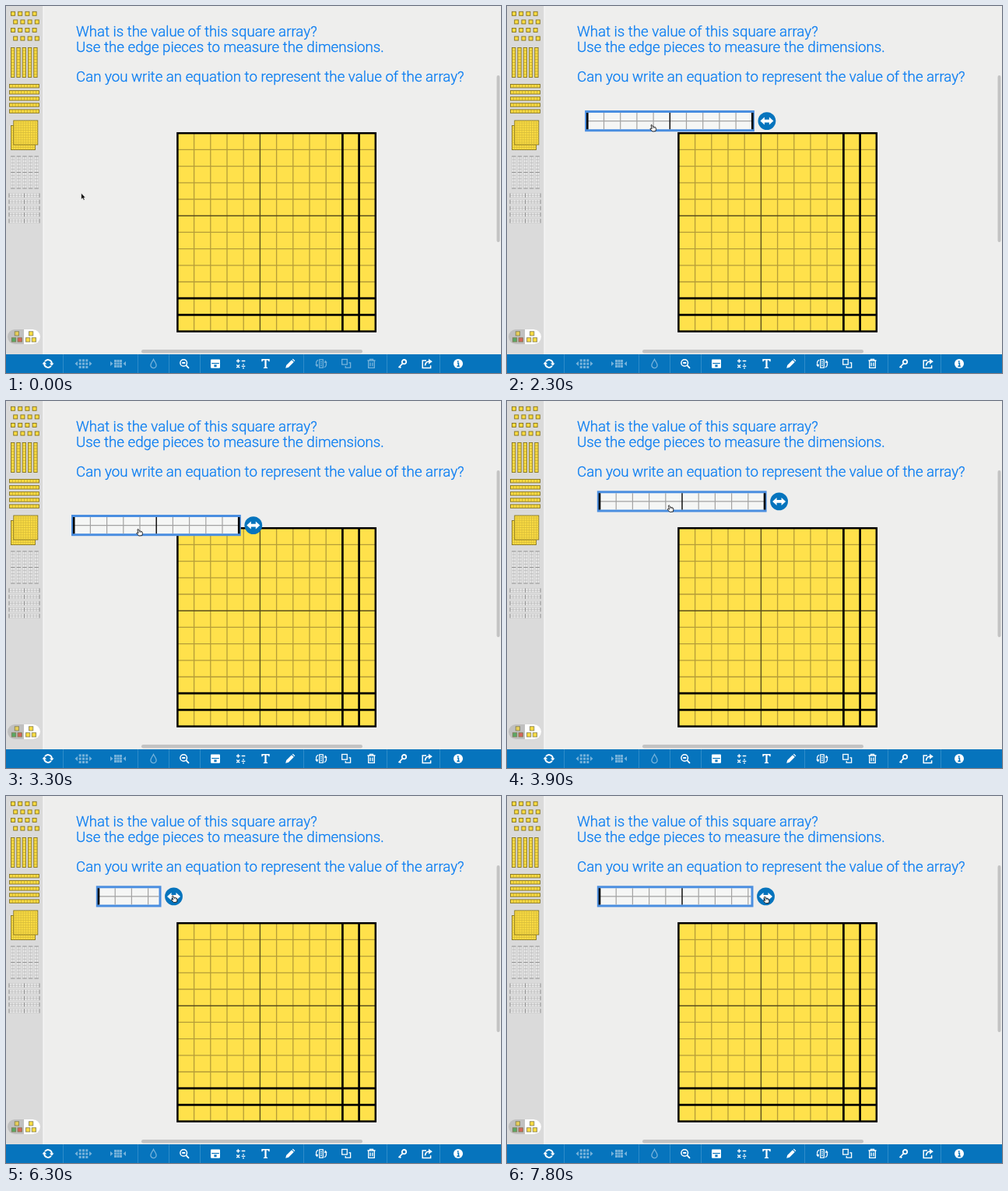
An HTML page that plays this animation: 636x471 px, repeating every 8900 ms.

```html
<!DOCTYPE html>
<html lang="en">
<head>
<meta charset="utf-8">
<title>Square array</title>
<style>
html, body { margin: 0; width: 100%; height: 100%; overflow: hidden; background: #eeeeed; }
svg { display: block; width: 636px; height: 471px; }
.ask { font: 300 18.69px Roboto, sans-serif; fill: #087cf2; stroke: #087cf2; stroke-width: .3px; }
</style>
</head>
<body>
<svg id="stage" viewBox="0 0 636 471" xmlns="http://www.w3.org/2000/svg">
  <rect width="636" height="471" fill="#eeeeed"/>
  <g id="side"></g>
  <g class="ask">
    <text x="90" y="39.4">What is the value of this square array?</text>
    <text x="90" y="58.8">Use the edge pieces to measure the dimensions.</text>
    <text x="90" y="97.2">Can you write an equation to represent the value of the array?</text>
  </g>
  <g id="array"></g>
  <g fill="#c3c3c3">
    <rect x="630.5" y="89" width="4" height="214" rx="2"/>
    <rect x="174" y="441" width="284" height="4.4" rx="2.2"/>
  </g>
  <g id="tools"></g>
  <g id="bar">
    <rect id="frame" x="1.5" y="1.5" height="24.2" fill="#f5f6f5" stroke="#4a8ee0" stroke-width="3"/>
    <path id="thin" fill="none" stroke="#a3a3a3" stroke-width="1.2"/>
    <path id="mid" fill="none" stroke="#111" stroke-width="1.5"/>
    <path id="thick" fill="none" stroke="#000" stroke-width="2.6"/>
    <g id="knob">
      <circle r="11.4" fill="#0674bd"/>
      <path d="M-8.5 0l5.5-5v3.2h6v-3.2l5.5 5l-5.5 5v-3.2h-6v3.2z" fill="#fff"/>
    </g>
  </g>
  <path id="arrow" d="M0 0V7.8L1.8 6.2L3.1 9L4.4 8.4L3.2 5.7H5.4Z" fill="#000" stroke="#fff" stroke-width=".5"/>
  <g id="hand" stroke="#111" stroke-width=".9" stroke-linejoin="round">
    <path d="M-2.6-3.9Q-1.6-5-.9-3.6L.1-1.4Q1.2-2.3 1.9-1.4Q3.1-1.8 3.6-.5Q4.2 1.6 3.4 3.8L-.6 4.2L-3.6 1.4Q-4-.1-2.3.4L-1.4.9Z" fill="#fff"/>
    <path d="M.2-1.2l.7 1.5M2-1.2l.5 1.3" fill="none" stroke-width=".6"/>
  </g>
</svg>
<script>
const $ = id => document.getElementById(id);
const rect = (x, y, w, h, more) => `<rect x="${x}" y="${y}" width="${w}" height="${h}" ${more}/>`;
const path = (d, more = '') => `<path d="${d}" ${more}/>`;
const range = n => [...Array(n).keys()];
const GOLD = 'fill="#fbdc42" stroke="#83721f" stroke-width=".9"';

// a strip or sheet cut into cols x rows
function sheet(x, y, w, h, cols, rows, look, ink) {
  let d = '';
  for (let i = 1; i < cols; i++) d += `M${x + w * i / cols} ${y}v${h}`;
  for (let i = 1; i < rows; i++) d += `M${x} ${y + h * i / rows}h${w}`;
  return rect(x, y, w, h, look) + path(d, `stroke="${ink}" stroke-width=".7"`);
}

function drawSide() {
  let s = rect(0, 0, 47.5, 447, 'fill="#dadada"') + rect(47.5, 0, 1.2, 447, 'fill="#f6f6f6"');
  for (const r of range(4)) for (const c of range(4))
    s += rect(6.5 + c * 9.2 + r % 2 * 3.2, 7.3 + r * 10.6, 5, 5, GOLD);
  for (const i of range(5)) {
    s += sheet(6.5 + i * 7.3, 53.5, 4.4, 38, 1, 10, GOLD, '#b39c30');
    s += sheet(4.5, 100.5 + i * 8.1, 38, 4.4, 10, 1, GOLD, '#b39c30');
  }
  s += sheet(6.5, 153.5, 31, 31, 10, 10, GOLD, '#d3b93b');
  s += sheet(9.8, 147, 31, 31, 10, 10, GOLD, '#d3b93b');
  const pale = 'fill="#ebebeb" stroke="#c6c6c6" stroke-width=".5"';
  for (const i of range(5)) {
    const x = 6.5 + i * 7.6, y = 240.8 + i * 8.2;
    s += sheet(x, 193, 4.6, 41, 2, 10, pale, '#b4b4b4') +
      path(`M${x - .4} 193h5.4M${x - .4} 213.5h5.4M${x - .4} 234h5.4`, 'stroke="#858585" stroke-width=".8"');
    s += sheet(4, y, 39, 4.6, 10, 2, pale, '#b4b4b4') +
      path(`M4 ${y - .4}v5.4M23.5 ${y - .4}v5.4M43 ${y - .4}v5.4`, 'stroke="#858585" stroke-width=".8"');
  }
  s += rect(2, 415, 42, 19, 'rx="9.5" fill="#c0c0c0"');
  s += path('M23 415h11.5a9.5 9.5 0 0 1 0 19H23z', 'fill="#fff"');
  const chip = (x, y, c) => rect(x, y, 5.4, 5.2, `fill="${c}" stroke="#7d7a50" stroke-width=".8"`);
  s += chip(11.2, 417.8, '#e6cd58') + chip(7.3, 425.8, '#5aa865') + chip(15, 425.8, '#d3645a');
  s += chip(29.4, 417.8, '#fbdc42') + chip(25.4, 425.8, '#fbdc42') + chip(33.2, 425.8, '#fbdc42');
  $('side').innerHTML = s;
}

function drawArray() {
  const x = 220.4, y = 163.2, u = 21.2, size = 12 * u;
  const cut = list => list.map(i => `M${x + i * u} ${y}v${size}M${x} ${y + i * u}h${size}`).join('');
  $('array').innerHTML = rect(x, y, size, size, 'fill="#ffe14b"') +
    path(cut([1, 2, 3, 4, 6, 7, 8, 9]), 'stroke="#b59d38" stroke-width="1.3"') +
    path(cut([5]), 'stroke="#5c501d" stroke-width="1.4"') +
    path(cut([10, 11]), 'stroke="#000" stroke-width="2.7"') +
    rect(x, y, size, size, 'fill="none" stroke="#000" stroke-width="2.5"');
}

function drawTools() {
  const solid = 'fill="#fff" stroke="none"';
  const icon = (x, body) => `<g transform="translate(${x} 459)">${body}</g>`;
  const dots = (x, y, cols, rows, gap, size) => {
    let s = '';
    for (const r of range(rows)) for (const c of range(cols))
      s += rect(x + c * gap, y + r * gap, size, size, solid);
    return s;
  };
  const dim = [
    icon(99.5, dots(-5.8, -5.6, 3, 3, 4.3, 3) +
      path('M-7.5-3l-3.5 3l3.5 3zM7.5-3l3.5 3l-3.5 3z', solid)),
    icon(144, dots(-5, -5, 3, 3, 3.5, 3) +
      path('M-10-3l3.5 3l-3.5 3zM10-3l-3.5 3l3.5 3z', solid)),
    icon(189.5, path('M0-5.5C1.5-2.5 3.6-.5 3.6 2A3.6 3.6 0 0 1-3.6 2C-3.6-.5-1.5-2.5 0-5.5z', 'stroke-width="1.3"'))
  ].join('');
  const edit = [
    icon(405, rect(-2.3, -5.2, 4.6, 10.4, 'stroke-width="1.2"') +
      path('M-.8-2.4H.8M-.8 0H.8M-.8 2.4H.8', 'stroke-width="1.2"') +
      path('M-3.8-4.6Q-7.4-3.6-6.2 2.2M3.8 4.6Q7.4 3.6 6.2-2.2', 'stroke-width="1.2"') +
      path('M-7.8 1.4l2.8 3l1.2-3.6zM7.8-1.4l-2.8-3l-1.2 3.6z', solid)),
    icon(437, rect(-5.3, -5.5, 6.6, 6.6, 'stroke-width="1.3"') + path('M3.4-1.2h2.2v6.4H-.8v-2.2', 'stroke-width="1.3"')),
    icon(469.5, path('M-5-4H5M-2-4v-1.6h4V-4M-3.8-3.5V5.4h7.6V-3.5M-1.4-1.5v4.8M1.4-1.5v4.8', 'stroke-width="1.3"'))
  ].join('');
  const plain = [
    icon(54, path('M-4-2.8A4.9 4.9 0 0 1 4.9 0M4 2.8A4.9 4.9 0 0 1-4.9 0', 'stroke-width="1.9"') +
      path('M1.9-.6h5.6L4.8 2.8zM-1.9.6h-5.6L-4.8-2.8z', solid)),
    icon(229, '<circle cx="-.8" cy="-1" r="4.3"/>' + path('M-2.8-1h4M2.4 2.2L6 5.8', 'stroke-width="1.8"')),
    icon(269, rect(-6, -5.5, 12, 11.2, `rx="1" ${solid}`) +
      path('M-4.8-.4h9.6', 'stroke="#0674bd" stroke-width="1.2"') +
      rect(-1.6, 1.4, 3.2, 2.8, 'fill="#0674bd" stroke="none"')),
    icon(301.5, path('M-5.5-3.5h4.6M-3.2-5.8v4.6M1.2-3.5h4.6M-5.2 1.5l3.8 3.8M-1.4 1.5l-3.8 3.8M1.2 3.4h4.6', 'stroke-width="1.4"') +
      '<g fill="#fff" stroke="none"><circle cx="3.5" cy="1.1" r=".9"/><circle cx="3.5" cy="5.7" r=".9"/></g>'),
    icon(333.5, path('M-5.2-6h10.4v3.2H4Q3.7-4.4 2.4-4.4H1.1V4.6L2.6 5V6h-5.2V5l1.5-.4V-4.4H-2.4Q-3.7-4.4-4-2.8h-1.2z', solid)),
    icon(365, path('M-5.8 5.8l1-3.8L2-4.8l2.8 2.8L-2 4.8zM2.8-5.5l1-.8l2.5 2.5l-.8 1z', solid)),
    icon(509.5, '<circle cx="2" cy="-2.3" r="2.7" stroke-width="1.8"/>' +
      path('M0-.2L-5 5M-3.8 3.8l1.6 1.6', 'stroke-width="1.8"')),
    icon(541, path('M-1-4h-4.8v9.4h10.4V2.2') + path('M-2.5 2.5Q-2-2.5 2.6-2.8', 'stroke-width="1.8"') +
      path('M2-6.2l4.8 3.5l-4.8 3.5z', solid)),
    icon(581, `<circle r="6" ${solid}/>` + path('M-1.2-.8H.4V3.4M-1.6 3.4h3.4M-.3-3.8v1.7', 'stroke="#0674bd" stroke-width="1.6"'))
  ].join('');
  const rules = [73.5, 169.5, 209.5, 249.5, 382.5, 489.5, 557.5].map(x => `M${x} 447v24`).join('');
  $('tools').innerHTML = rect(0, 447, 636, 24, 'fill="#0674bd"') +
    path(rules, 'stroke="#2f8cc9" stroke-width="1"') +
    `<g fill="none" stroke="#fff" stroke-width="1.5"><g opacity=".45">${dim}</g><g id="edit">${edit}</g>${plain}</g>`;
}

// smooth value through [time, value] keys, without overshoot
function track(keys, t) {
  const last = keys.length - 1;
  if (t <= keys[0][0]) return keys[0][1];
  if (t >= keys[last][0]) return keys[last][1];
  const i = keys.findIndex(k => k[0] > t) - 1;
  const slope = j => j < 0 || j >= last ? 0 : (keys[j + 1][1] - keys[j][1]) / (keys[j + 1][0] - keys[j][0]);
  const tangent = j => {
    const a = slope(j - 1), b = slope(j);
    return a * b <= 0 ? 0 : 2 * a * b / (a + b);
  };
  const [t0, v0] = keys[i], [t1, v1] = keys[i + 1];
  const h = t1 - t0, u = (t - t0) / h, w = 1 - u;
  return v0 * w * w * (1 + 2 * u) + v1 * u * u * (3 - 2 * u) +
    h * u * w * (tangent(i) * w - tangent(i + 1) * u);
}

const LOOP = 8900, TICK = 100, CELL = 21.2;
const barX = [[1100, 4], [1200, 75.5], [2100, 75.5], [2300, 100.1], [2500, 156.5],
  [2900, 72.2], [3000, 71], [3300, 84], [3700, 115.8]];
const barY = [[1100, 238], [1200, 122.3], [2100, 122.3], [2300, 134], [2400, 137],
  [2700, 88.5], [2900, 118], [3000, 120], [3300, 146], [3700, 115.3]];
const barEnd = [[4900, 333.6], [5300, 404.3], [5700, 404.3], [6350, 196], [6700, 290],
  [7100, 243], [7300, 222], [7600, 286], [7800, 316.5]];
const walkX = [[200, 96.7], [900, 30.5], [1400, 30.5], [1900, 162.5]];
const walkY = [[200, 240.2], [900, 257.5], [1400, 257.5], [1900, 145]];
const reachX = [[3800, 203.7], [4600, 349.8]];
const gripX = [[6700, .6], [7100, -7.6], [7400, 3], [7800, .6]];
const gripY = [[3800, 138.5], [4600, 132], [5300, 131.5], [6700, 133], [7100, 135.5], [7800, 133.5]];

const place = (id, x, y) => $(id).setAttribute('transform', `translate(${x.toFixed(2)} ${y.toFixed(2)})`);
const show = (id, on) => $(id).setAttribute('visibility', on ? 'visible' : 'hidden');

function drawBar(t) {
  show('bar', t >= 1100);
  show('knob', t >= 1200);
  const x = track(barX, t), y = track(barY, t);
  const w = t < 5000 ? 217.8 : track(barEnd, t) - x;
  const lines = { thin: `M3 13.6H${w - 3}`, mid: '', thick: '' };
  for (let i = 0; 3.2 + i * CELL < w - 2; i++) {
    const kind = i % 10 === 0 ? 'thick' : i % 5 === 0 ? 'mid' : 'thin';
    lines[kind] += `M${3.2 + i * CELL} 3v21.2`;
  }
  for (const k in lines) $(k).setAttribute('d', lines[k]);
  $('frame').setAttribute('width', w - 3);
  place('bar', x, y);
  place('knob', w + 16, 13.6);
  return { x, y, end: x + w };
}

function drawPointer(t, bar) {
  let x, y;
  if (t < 2200) [x, y] = [track(walkX, t), track(walkY, t)];
  else if (t < 3800) [x, y] = [bar.x + 87.5, bar.y + 22.8];
  else if (t < 5000) [x, y] = [track(reachX, t), track(gripY, t)];
  else [x, y] = [bar.end + 16 + track(gripX, t), track(gripY, t)];
  const overBar = x > bar.x && y > bar.y && y < bar.y + 27;
  const hand = t >= 1900 || x < 46 || t >= 1200 && overBar;
  show('hand', hand);
  show('arrow', !hand);
  place(hand ? 'hand' : 'arrow', x, y);
}

function draw(ms) {
  const t = Math.floor(ms % LOOP / TICK) * TICK;
  $('edit').setAttribute('opacity', t < 1100 ? .45 : t < 1200 ? .75 : 1);
  drawPointer(t, drawBar(t));
}

drawSide();
drawArray();
drawTools();
const start = performance.now();
function tick() {
  draw(performance.now() - start);
  requestAnimationFrame(tick);
}
tick();
</script>
</body>
</html>
```
